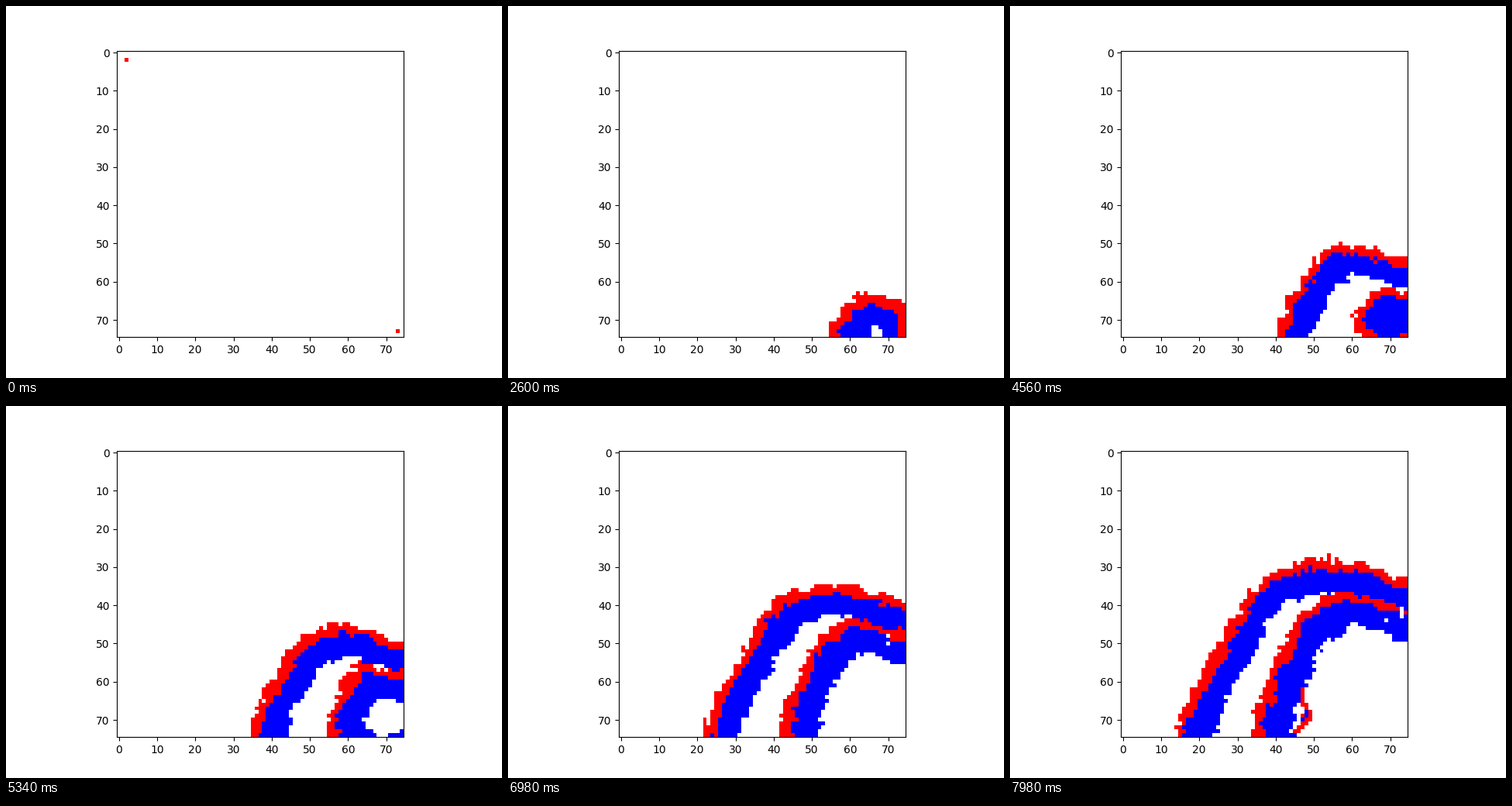
Write a matplotlib script that moves like this. It is 640x480 px and loops after 8 s.

```python
import numpy as np
import matplotlib.pyplot as plt
from matplotlib.animation import FuncAnimation
from matplotlib.colors import ListedColormap

N = 75
STEPS = 400
SICK = 18      # steps spent red
CYCLE = 65     # steps until a cell is susceptible again
GRACE = 20     # a wave waits this long for an immune cell

rng = np.random.default_rng(7)
row, col = np.mgrid[0:N, 0:N]


def roughness():
    """Random delay in steps: soft patches plus single-cell jitter."""
    grain = rng.normal(size=(N, N))
    soft = sum(np.roll(grain, (i, j), (0, 1))
               for i in (-1, 0, 1) for j in (-1, 0, 1)) / 3
    return 4 * soft + rng.normal(0, 2, (N, N))


def arrival(x, y, start, speed, lean=0, toward=0, reach=np.inf):
    """Step at which a wave from (x, y) infects each cell.

    Angles run from left (0) over up (90); the front moves faster by
    `lean` in the direction `toward` and has five shallow lobes.
    """
    dist = np.hypot(col - x, row - y)
    angle = np.arctan2(y - row, x - col)
    pace = (speed + lean * np.cos(angle - np.radians(toward))
            + 0.007 * np.cos(5 * angle + np.radians(50)))
    when = np.maximum(start + dist / pace + roughness(), 1)
    return np.where(dist <= reach, when, np.inf)


seed = arrival(73, 73, 0, 0.06, reach=3)
seed[73, 73] = seed[2, 2] = 0

arrivals = [
    seed,
    arrival(67, 74, 48, 0.128, 0.019),
    arrival(70.5, 70.5, 165, 0.135, 0.020, toward=35),
    arrival(43, 66, 290, 0.080, 0.030, toward=-20),
    arrival(69, 71, 255, 0.100, 0.035, toward=30),
    arrival(70, 74, 352, 0.140, 0.030),
]

# An immune cell either catches the wave late or is skipped by it.
waves = []
free = np.zeros((N, N))
for when in arrivals:
    when = np.where(when < free - GRACE, np.inf, np.maximum(when, free))
    free = np.where(np.isfinite(when), when + CYCLE, free)
    waves.append(when)


def state(step):
    grid = np.zeros((N, N))
    for when in waves:
        age = step - when
        grid[(age >= 0) & (age < SICK)] = 1
        grid[(age >= SICK) & (age < CYCLE)] = 2
    return grid


fig, ax = plt.subplots(figsize=(6.4, 4.8), dpi=100)
image = ax.imshow(state(0), cmap=ListedColormap(["white", "red", "blue"]),
                  vmin=0, vmax=2, interpolation="nearest")


def update(step):
    image.set_data(state(step))
    return [image]


anim = FuncAnimation(fig, update, frames=STEPS, interval=20,
                     repeat=True, repeat_delay=0)
plt.show()
```
